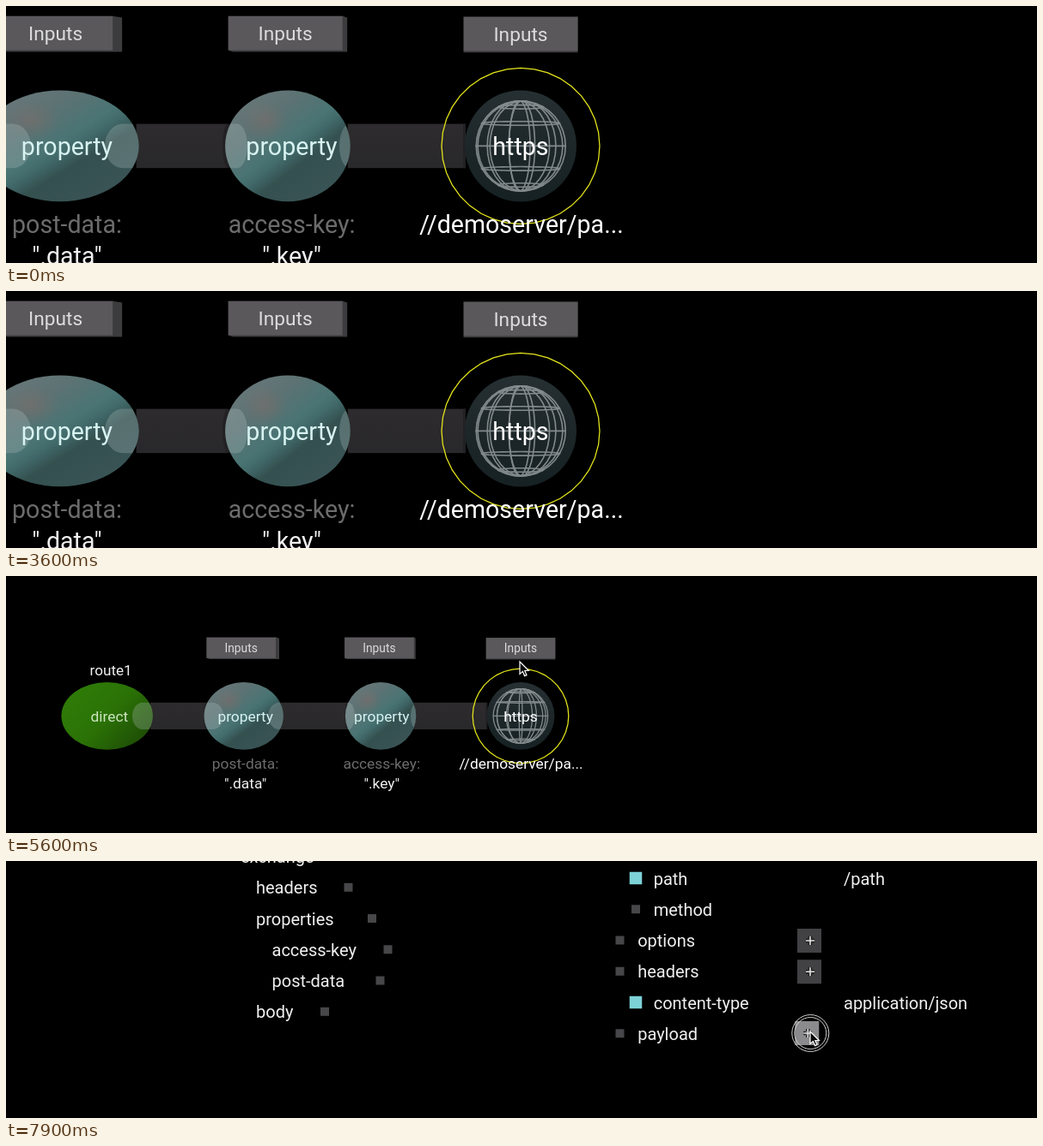
Animation of 1200x300 px, one loop 8000 ms. Source, as an HTML page:

```html
<!DOCTYPE html>
<html lang="en">
<head>
<meta charset="utf-8">
<title>Route editor</title>
<style>
html, body { margin: 0; width: 100%; height: 100%; overflow: hidden; background: #000; }
svg { display: block; width: 100%; height: 100%; }
text { font-family: Roboto, sans-serif; }
</style>
</head>
<body>
<svg viewBox="0 0 1200 300">
  <defs>
    <linearGradient id="teal" x1=".12" y1=".08" x2=".85" y2=".92">
      <stop offset="0" stop-color="#697779"/>
      <stop offset=".25" stop-color="#5c7273"/>
      <stop offset=".48" stop-color="#4a7474"/>
      <stop offset=".56" stop-color="#426a6b"/>
      <stop offset=".68" stop-color="#34504f"/>
      <stop offset="1" stop-color="#3a5456"/>
    </linearGradient>
    <linearGradient id="green" x1="0" y1=".15" x2="1" y2=".85">
      <stop offset="0" stop-color="#2f7d08"/>
      <stop offset=".5" stop-color="#2b7206"/>
      <stop offset="1" stop-color="#1c4806"/>
    </linearGradient>
    <radialGradient id="glow" cx=".32" cy=".27" r=".18">
      <stop offset="0" stop-color="#8a6a64" stop-opacity=".38"/>
      <stop offset="1" stop-color="#8a6a64" stop-opacity="0"/>
    </radialGradient>
    <linearGradient id="dark" x1="0" y1="0" x2="0" y2="1">
      <stop offset="0" stop-color="#263033"/>
      <stop offset=".5" stop-color="#1d2729"/>
      <stop offset="1" stop-color="#162123"/>
    </linearGradient>
    <linearGradient id="tube" x1="0" y1="0" x2="0" y2="1">
      <stop offset="0" stop-color="#2d2b2d"/>
      <stop offset="1" stop-color="#29282a"/>
    </linearGradient>
  </defs>
  <g id="scene"></g>
</svg>
<script>
const LOOP = 8000, STEP = 100;
// centre of the view; MID is the axis of the solid shapes
const CX = 599, CY = 164, MID = 163.4, DEPTH = 529;
const scene = document.getElementById('scene');

const clamp = v => Math.max(0, Math.min(1, v));
const ease = (t, a, b) => { const u = clamp((t - a) / (b - a)); return u * u * (3 - 2 * u); };
const mix = (a, b, u) => a + (b - a) * u;
const n = v => v.toFixed(2);

const rect = (x, y, w, h, fill, more = '') =>
  `<rect x="${n(x)}" y="${n(y)}" width="${n(w)}" height="${n(h)}" fill="${fill}" ${more}/>`;
const box = (x, y, size, fill) => rect(x - size / 2, y - size / 2, size, size, fill);
const oval = (x, y, rx, ry, fill, more = '') =>
  `<ellipse cx="${n(x)}" cy="${n(y)}" rx="${n(rx)}" ry="${n(ry)}" fill="${fill}" ${more}/>`;
const label = (str, x, y, size, fill = '#f0f0f0', anchor = 'middle', more = '') =>
  `<text x="${n(x)}" y="${n(y + size * .355)}" font-size="${n(size)}" fill="${fill}" text-anchor="${anchor}" ${more}>${str}</text>`;
const line = (pts, stroke, width, close = '') =>
  `<path d="M${pts.map(p => n(p[0]) + ' ' + n(p[1])).join('L')}${close}" fill="none" stroke="${stroke}" stroke-width="${n(width)}"/>`;

// x: sphere centre, capL / capR: inner ends of the pipes that enter it
const nodes = [
  { x: -793, tx: -789, name: 'direct', fill: 'green', ink: '#cfe6c0', capR: -745, bulge: 20, title: 'route1' },
  { x: -531, tx: -528, name: 'property', fill: 'teal', ink: '#d8f3f1', capL: -570, capR: -484, bulge: 21,
    key: 'post-data:', value: '".data"', inputs: -536 },
  { x: -268.4, tx: -266.5, name: 'property', fill: 'teal', ink: '#d8f3f1', capL: -318, capR: -211, bulge: 12,
    key: 'access-key:', value: '".key"', inputs: -271.2 }
];

const ring = (s) => {
  const pts = [];
  for (let i = 0; i < 36; i++) {
    const a = i * Math.PI / 18;
    pts.push([CX + 92 * s * Math.cos(a), MID + 91 * s * Math.sin(a)]);
  }
  return line(pts, '#e6e61c', 1.25, 'Z');
};

function globe(s, turn) {
  const R = 52.5, D = DEPTH / s, rad = Math.PI / 180;
  const point = (lat, lon) => {
    const r = R * Math.cos(lat * rad), z = r * Math.cos(lon * rad), f = s * D / (D - z);
    return [CX + r * Math.sin(lon * rad) * f, MID - R * Math.sin(lat * rad) * f];
  };
  const arc = (from, to, at) => {
    const pts = [];
    for (let a = from; a <= to; a += 10) pts.push(at(a));
    return line(pts, '#a9b0b2', 1.6 * Math.sqrt(s));
  };
  let out = '';
  for (let lon = 0; lon < 360; lon += 30) out += arc(-90, 90, a => point(a, lon + turn));
  for (let lat = -60; lat <= 60; lat += 30) out += arc(0, 360, a => point(lat, a));
  return oval(CX, MID, 65 * s, 65 * s, 'url(#dark)') + `<g opacity=".72">${out}</g>`;
}

function inputs(x, s, outlined) {
  const y = CY - (x ? 132.3 : 131.5) * s, w = 133 * s, h = 40 * s;
  const cx = CX + x * s * (1 + .01 * s ** 6), d = -x * .0205 * s * s;
  const left = cx - w / 2, top = y - h / 2, drop = 1.8 * s;
  const side = `<path d="M${n(left)} ${n(top + h)}l${n(d)} ${n(drop)}h${n(w)}v${n(-h)}l${n(-d)} ${n(-drop)}z" fill="#3c3b3d"/>`;
  const edge = outlined ? 'stroke="#111" stroke-width="3" paint-order="stroke" stroke-linejoin="round"' : '';
  return side + rect(left, top, w, h, '#5a585b') + label('Inputs', cx, y, 22.7 * s, '#dcdcdc', 'middle', edge);
}

function chain(s, turn, panel) {
  const X = x => CX + x * s;
  const half = 25.8 * s;
  const balls = nodes.map(o => ({
    x: CX + o.x * s * (1 + .01 * s ** 6), ry: 64.9 * s, rx: 64.9 * s * Math.hypot(1, o.x * s / DEPTH)
  }));
  let out = '';
  balls.forEach((b, i) => {
    const next = balls[i + 1], from = b.x + b.rx - 3, to = next ? next.x - next.rx + 3 : X(-64);
    out += rect(from, MID - half, to - from, half * 2, 'url(#tube)');
    if (next) out += oval(to, MID, 6 * s, half, '#232124');
    else out += rect(to - 3 * s, MID - half, 3 * s, half * 2, '#222124');
  });
  nodes.forEach((o, i) => {
    const b = balls[i], id = 'ball' + i, bulge = o.bulge * s;
    out += `<clipPath id="${id}">${oval(b.x, MID, b.rx, b.ry, '#fff')}</clipPath>`;
    out += oval(b.x, MID, b.rx, b.ry, `url(#${o.fill})`);
    if (o.key) out += oval(b.x, MID, b.rx, b.ry, 'url(#glow)');
    const cap = (x, dir) => {
      const end = X(x), sweep = dir > 0 ? 0 : 1, far = dir * b.rx * 2;
      return `<path d="M${n(end + dir * bulge)} ${n(MID - half)}A${n(bulge)} ${n(half)} 0 0 ${sweep} ${n(end + dir * bulge)} ${n(MID + half)}h${n(far)}v${n(-2 * half)}z" fill="#b4c4c4" fill-opacity=".27" clip-path="url(#${id})"/>`;
    };
    if (o.capL) out += cap(o.capL, -1);
    out += cap(o.capR, 1);
    out += label(o.name, X(o.tx), CY, 28.6 * s, o.ink);
    if (o.title) out += label(o.title, X(-786), CY - 89 * s, 28.2 * s);
    if (o.key) {
      out += label(o.key, X(o.tx), CY + 90.5 * s, 28.6 * s, '#6c6c6c');
      out += label(o.value, X(o.tx), CY + 128 * s, 28.6 * s);
      out += inputs(o.inputs, s, panel);
    }
  });
  out += inputs(0, s, panel) + globe(s, turn) + ring(s);
  out += label('https', CX, CY, 28.6 * s, '#fff');
  out += label('//demoserver/pa...', CX + s, CY + 91 * s, 28.6 * s, '#fff');
  if (panel) {
    const bottom = CY - 150 * s;
    out += rect(X(-209), -40, 418 * s, bottom + 40, '#070609', 'stroke="#dedede" stroke-width="1.3"');
  }
  return out;
}

const ROW = 36.25;
const fields = [
  ['exchange', 273, -1], ['headers', 291, 0, 398.5], ['properties', 291, 1, 426],
  ['access-key', 309.5, 2, 444.5], ['post-data', 309.5, 3, 435.5], ['body', 291, 4, 371]
];
const params = [
  { name: 'path', deep: 1, value: '/path' }, { name: 'method', deep: 1 },
  { name: 'options', add: 1 }, { name: 'headers', add: 1 },
  { name: 'content-type', deep: 1, value: 'application/json' }, { name: 'payload', add: 1 }
];

function addButton(x, y, pressed) {
  const cross = `M${n(x - 4)} ${n(y)}h10M${n(x + 1)} ${n(y - 5)}v10`;
  return box(x, y, 28, pressed ? '#8b8a8c' : '#424143') +
    `<path d="${cross}" stroke="#161616" stroke-width="4.5" stroke-dasharray="2.5 1.2"/>` +
    `<path d="${cross}" stroke="#e4e4e4" stroke-width="1.6"/>`;
}

function tree(shift, pressed) {
  let out = '';
  for (const [name, x, row, mark] of fields) {
    const y = 31.3 + row * ROW;
    out += label(name, x, y, 20, '#f0f0f0', 'start');
    if (mark) out += box(mark, y - .5, 10, '#474648');
  }
  params.forEach((p, i) => {
    const y = 20.5 + i * ROW, x = p.deep ? 733 : 714.5;
    out += p.value ? box(x, y - .5, 14.5, '#7dd2d7') : box(x, y - .5, 10, '#474648');
    out += label(p.name, x + 20.7, y, 20, '#f0f0f0', 'start');
    if (p.value) out += label(p.value, 975, y, 20, '#f0f0f0', 'start');
    if (p.add) {
      const down = pressed && p.name === 'payload';
      out += addButton(down ? 932.3 : 935, down ? y - .8 : y, down);
    }
  });
  return `<g transform="translate(${n(shift)} 0)">${out}</g>`;
}

const cursor = (x, y) =>
  `<path transform="translate(${n(x)} ${n(y)})" d="M0 0V14.5L3.4 11.4L5.6 16.6L8 15.6L5.8 10.5H10.4Z" fill="#0a0a0a" stroke="#fff" stroke-width="1.2"/>`;
const click = (x, y, r) =>
  [r, r - 3].map(v => oval(x, y, v, v, 'none', 'stroke="#cfcfcf" stroke-width="1"')).join('');

function draw(t) {
  let out;
  if (t < 6100) {
    const s = 1 / mix(1, 1.653, ease(t, 4650, 5650));
    out = chain(s, (t - 1600) / 120, t >= 4200 && t < 5500);
    if (t >= 3900) {
      const u = ease(t, 3900, 4300);
      const y = mix(265, 184, u) - 84 * ease(t, 5350, 5600) - 16 * ease(t, 5600, 5800);
      if (t >= 5900) out += click(598, 86, 21.5);
      out += cursor(mix(630, 598, u), y);
    }
  } else {
    const pressed = t >= 7800;
    out = tree(118 * (1 - ease(t, 6400, 7200)), pressed);
    if (pressed) out += click(936.3, 201, t < 7900 ? 22.5 : 21.5);
    if (t >= 7200) {
      const u = ease(t, 7100, 7600);
      out += cursor(mix(850, 936, u), mix(296, 199, u));
    }
  }
  scene.innerHTML = out;
}

const start = performance.now();
let last = -1;
function tick() {
  const t = Math.floor((performance.now() - start) % LOOP / STEP) * STEP;
  if (t !== last) draw(last = t);
  requestAnimationFrame(tick);
}
tick();
</script>
</body>
</html>
```
